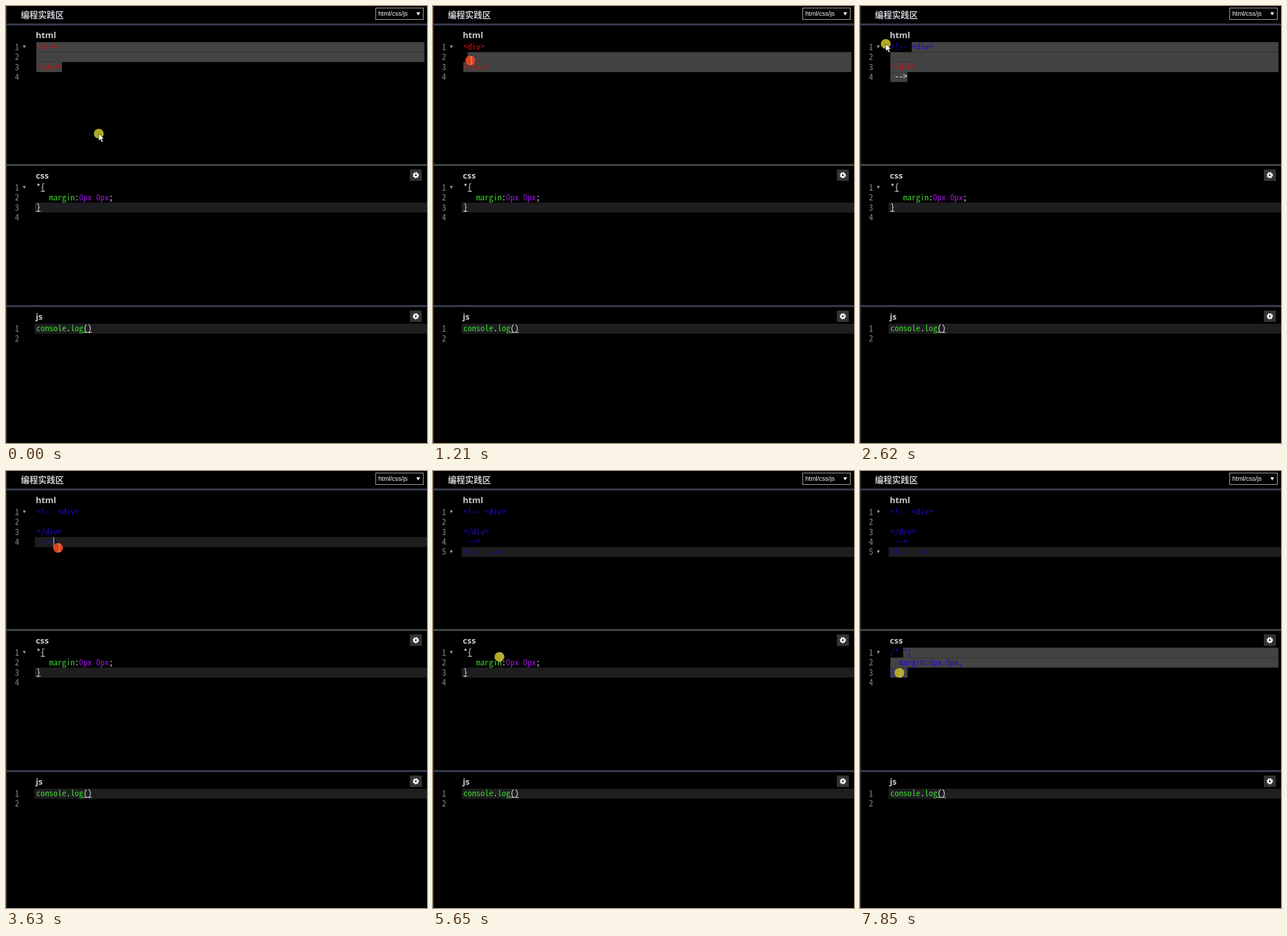
Recreate the animation shown at these times as an HTML page. Size 735x762 px, loop 8000 ms.

```html
<!DOCTYPE html>
<html lang="zh">
<head>
<meta charset="utf-8">
<style>
html, body { margin: 0; width: 100%; height: 100%; overflow: hidden; background: #000; }
svg { display: block; width: 100vw; height: 100vh; }
text { white-space: pre; }
.code { font-family: "Noto Sans Mono CJK SC", "Noto Sans Mono CJK JP", "Liberation Mono", monospace; }
.head { font: bold 15px "Open Sans", "Noto Sans CJK SC", "Noto Sans CJK JP", sans-serif; fill: #c8c8d0; }
.pick { font: 11px "Liberation Sans", Arial, sans-serif; fill: #fff; }
</style>
</head>
<body>
<svg viewBox="0 0 735 762">
  <defs>
    <g id="gear">
      <rect x="-10.5" y="-10" width="21" height="20" fill="#323237"/>
      <circle r="3" fill="none" stroke="#fff" stroke-width="2.6"/>
      <circle r="4.7" fill="none" stroke="#fff" stroke-width="1.8" stroke-dasharray="1.9 1.79"/>
    </g>
    <path id="arrow" d="M0 0V12.6L3 9.9L5.2 15L7.3 14.1L5.1 9.1H9Z" fill="#fff" stroke="#222" stroke-width=".7"/>
    <path id="beam" d="M-1.5 -6.5H.2M.8 -6.5H2.5M.5 -6V6M-1.5 6.5H.2M.8 6.5H2.5" fill="none" stroke="#bbb5a0"/>
  </defs>
  <rect width="735" height="762"/>
  <rect width="1.6" height="762" fill="#303330"/>
  <rect y="30.5" width="735" height="3.5" fill="#38384c"/>
  <rect y="275.5" width="735" height="3.5" fill="#414741"/>
  <rect y="521.5" width="735" height="3.5" fill="#3b3950"/>
  <text class="head" x="26" y="21">编程实践区</text>
  <text class="head" x="52" y="56">html</text>
  <text class="head" x="52" y="301">css</text>
  <text class="head" x="52" y="547">js</text>
  <rect x="645.5" y="3.5" width="83" height="20" fill="#000" stroke="#b8b8a8"/>
  <text class="pick" x="650" y="17">html/css/js</text>
  <path d="M716.5 11H723L719.7 16.5Z" fill="#fff"/>
  <use href="#gear" x="715.5" y="295"/>
  <use href="#gear" x="715.5" y="541"/>
  <g id="view"></g>
</svg>
<script>
const LOOP = 8000, LEFT = 53, CH = 7.46, ROW = 17.4, EDGE = 730.5;
const TOP = { html: 63, css: 308, js: 554 };
const RED = '#c81414', BLUE = '#2408d2', GREEN = '#3cd42c', PURPLE = '#9a14dc', WHITE = '#e4e4e4';
const view = document.getElementById('view');

// Font size that gives the editor's column width
const FAMILY = '"Noto Sans Mono CJK SC", "Noto Sans Mono CJK JP", "Liberation Mono", monospace';
const pen = document.createElement('canvas').getContext('2d');
pen.font = '100px ' + FAMILY;
const SIZE = CH * 100 / pen.measureText('0').width;

// Pointer stops: time, x, y, pressed, shape
const STOPS = [
  [0, 162, 222.5, 0, 'arrow'], [200, 156, 208, 0, 'arrow'], [400, 118, 162, 0, 'arrow'],
  [610, 76, 133, 0, 'beam'], [810, 66, 126, 1, 'beam'], [1010, 66, 112, 1, 'beam'],
  [1210, 65, 95, 1, 'beam'], [1410, 52, 78, 1, 'beam'], [1620, 46, 68, 1, 'arrow'],
  [1830, 45, 66, 1, 'arrow'], [2040, 45, 66, 0, 'arrow'],
  [3440, 86, 124, 0, 'beam'], [3630, 91, 134, 1, 'beam'], [3840, 91, 134, 0, 'beam'],
  [5430, 106, 226, 0, 'arrow'], [5650, 116, 324, 0, 'beam'], [5850, 78, 361, 0, 'beam'],
  [6050, 70, 358, 1, 'beam'], [6250, 34, 326, 1, 'arrow'], [6460, 9, 306.5, 1, 'arrow'],
  [6640, 9, 306.5, 0, 'arrow'], [7650, 46, 338, 0, 'beam'], [7850, 69, 352, 0, 'beam']
];
const CHANGES = [2620, 3020, 4240, 4620, 4840, 7250];

const esc = s => s.replace(/&/g, '&amp;').replace(/</g, '&lt;');
const col = n => LEFT + n * CH;
const rowY = (pane, n) => TOP[pane] + (n - 1) * ROW;
const rect = (x, y, w, h, fill) =>
  `<rect x="${x}" y="${y}" width="${w}" height="${h}" fill="${fill}"/>`;

function line(pane, n, ...parts) {
  const spans = parts.map(([s, c]) => `<tspan fill="${c}">${esc(s)}</tspan>`).join('');
  return `<text class="code" font-size="${SIZE}" x="${LEFT}" y="${rowY(pane, n) + 13.2}">${spans}</text>`;
}

function gutter(pane, count, folds) {
  let out = '';
  for (let n = 1; n <= count; n++) {
    const y = rowY(pane, n);
    out += `<text class="code" font-size="${SIZE}" x="15.5" y="${y + 13.7}" fill="#85857f">${n}</text>`;
    if (folds.includes(n)) out += `<path d="M29.3 ${y + 5.8}h5.4l-2.7 5z" fill="#9a9a94"/>`;
  }
  return out;
}

const active = (pane, n) => rect(50, rowY(pane, n), 685, ROW, '#1e1e20');
const caret = (pane, n, c) => rect(col(c), rowY(pane, n), 1, ROW, '#ddd');
const under = (pane, n, c, len) => rect(col(c), rowY(pane, n) + 14.6, len * CH, 1, WHITE);

// Selection from row r1, column c1 up to row r2, column c2
function select(pane, r1, c1, r2, c2) {
  let out = '';
  for (let n = r1; n <= r2; n++) {
    const x = n === r1 ? col(c1) : LEFT;
    const end = n === r2 ? col(c2) : EDGE;
    if (end > x) out += rect(x, rowY(pane, n), end - x, ROW, '#434343');
  }
  return out;
}

function htmlPane(t) {
  let back = '', front = '';
  if (t < 810) back = select('html', 1, 0, 3, 6);
  else if (t < 1010) back = active('html', 4) + caret('html', 4, 0);
  else if (t < 1210) back = select('html', 3, 1, 4, 0);
  else if (t < 1410) back = select('html', 2, 1, 4, 0);
  else if (t < 2620) back = select('html', 1, 0, 4, 0);
  else if (t < 3630) back = select('html', 1, 5, 4, 4);
  else if (t < 4620) {
    back = active('html', 4);
    if (t < 4240) front = caret('html', 4, 4);
  } else {
    back = active('html', 5);
    if (t < 5430) front = caret('html', 5, t < 4840 ? 0 : 5);
  }
  const noted = t >= 2620, tinted = t >= 3020;
  let code = line('html', 1, noted ? ['<!-- <div>', BLUE] : ['<div>', RED]) +
    line('html', 3, ['</div>', tinted ? BLUE : RED]);
  if (noted) code += line('html', 4, [' -->', tinted ? BLUE : WHITE]);
  if (t >= 4840) code += line('html', 5, ['<!--  -->', BLUE]);
  return back + gutter('html', t < 4620 ? 4 : 5, t < 4840 ? [1] : [1, 5]) + code + front;
}

function cssPane(t) {
  let back;
  if (t < 6050) back = active('css', 3) + under('css', 1, 1, 1) + under('css', 3, 0, 1);
  else if (t < 6250) back = active('css', 3);
  else if (t < 7250) back = select('css', 1, 0, 3, 1);
  else back = select('css', 1, 3, 3, 4);
  const noted = t >= 7250, tinted = t >= 7650;
  return back + gutter('css', 4, [1]) +
    line('css', 1, noted ? ['/* *{', BLUE] : ['*{', WHITE]) +
    (tinted ? line('css', 2, ['  margin:0px 0px;', BLUE])
      : line('css', 2, ['   margin', GREEN], [':', WHITE], ['0px 0px', PURPLE], [';', WHITE])) +
    line('css', 3, [noted ? '} */' : '}', tinted ? BLUE : WHITE]);
}

function jsPane() {
  return active('js', 1) + gutter('js', 2, []) +
    line('js', 1, ['console', GREEN], ['.', WHITE], ['log', GREEN], ['()', WHITE]) +
    under('js', 1, 11, 2);
}

function pointer(t) {
  const [, x, y, down, shape] = STOPS.filter(s => s[0] <= t).pop();
  const dx = shape === 'beam' ? 1.5 : 0;
  return `<circle cx="${x}" cy="${y}" r="8.6" fill="${down ? '#e6451c' : '#b8b022'}" fill-opacity=".96"/>` +
    `<use href="#${shape}" x="${x + dx}" y="${y}"/>`;
}

const times = [...STOPS.map(s => s[0]), ...CHANGES].sort((a, b) => a - b);
let shown = -1;

function draw(t) {
  const step = times.filter(v => v <= t).pop();
  if (step === shown) return;
  shown = step;
  view.innerHTML = htmlPane(step) + cssPane(step) + jsPane() + pointer(step);
}

const start = performance.now();
function tick() {
  draw((performance.now() - start) % LOOP);
  requestAnimationFrame(tick);
}
draw(0);
requestAnimationFrame(tick);
</script>
</body>
</html>
```
